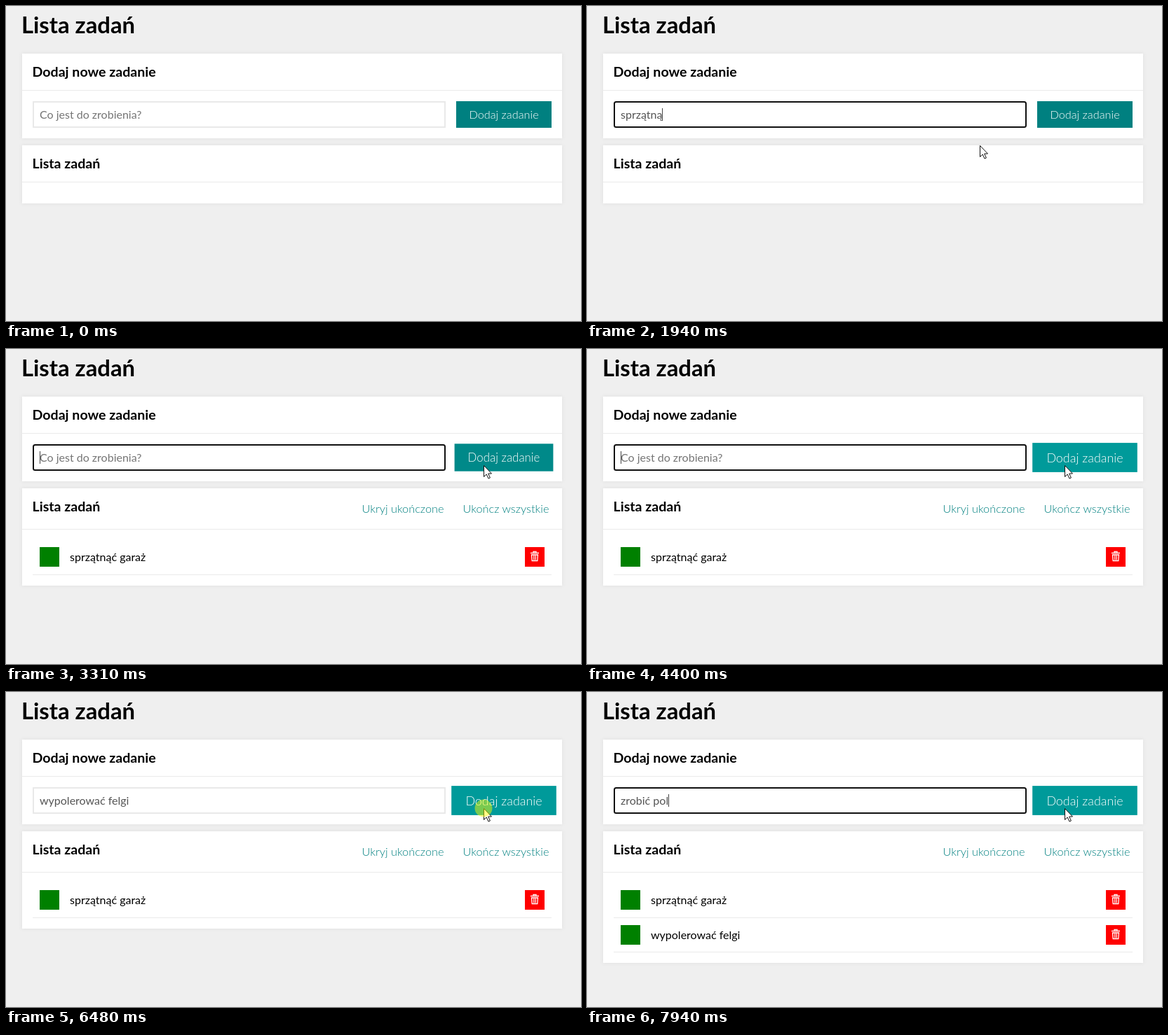
An HTML page that plays this animation: 820 px wide and 450 px high, repeating every 8 s.

```html
<!DOCTYPE html>
<html lang="pl">
<head>
<meta charset="utf-8">
<title>Lista zadań</title>
<style>
  html, body { margin: 0; width: 100%; height: 100%; overflow: hidden; background: #efefef; }
  svg { display: block; width: 820px; height: 450px; font: 16px Lato, sans-serif; }
  .card { fill: #fff; filter: drop-shadow(0 0 2.5px #ddd); }
  .line { fill: #eaeaea; }
  h1, .title { font-weight: 700; font-size: 32.8px; }
  .head { font-weight: 700; font-size: 19.6px; }
  .light { font-weight: 300; font-size: 16.3px; text-anchor: middle; }
  .link { fill: #008080; }
</style>
</head>
<body>
<svg viewBox="0 0 820 450">
  <defs>
    <g id="row">
      <rect x="48" y="283" width="28" height="28" fill="#008000"/>
      <rect x="740" y="283" width="28" height="28" fill="#f00"/>
      <g fill="none" stroke="#fff">
        <path d="M752 290.5v-1h4v1M748 291.5h12" stroke-width="1.4"/>
        <path d="M749.5 294h9l-.7 8.5h-7.6z" stroke-width="1.3"/>
        <path d="M752.3 294.5l.3 7M754 294.5v7M755.7 294.5l-.3 7" stroke-width=".8"/>
      </g>
    </g>
  </defs>
  <rect width="820" height="450" fill="#efefef"/>
  <text class="title" x="22" y="39">Lista zadań</text>

  <rect class="card" x="23" y="68" width="770" height="121"/>
  <rect class="line" x="23" y="120" width="770" height="1"/>
  <text class="head" x="37.5" y="101">Dodaj nowe zadanie</text>
  <rect id="field" fill="#fff" stroke-width="2" x="39" y="137" width="587" height="36"/>
  <text id="value" x="48" y="161"></text>
  <rect id="caret" y="146" width="1" height="18" fill="#444"/>

  <rect id="list" class="card" x="23" y="199" width="770" height="83"/>
  <rect id="listLine" class="line" x="23" width="770" height="1"/>
  <text class="head" x="37.5" y="232">Lista zadań</text>
  <g id="links">
    <text class="light link" x="566" y="234">Ukryj ukończone</text>
    <text class="light link" x="713" y="234">Ukończ wszystkie</text>
  </g>
  <g id="item0">
    <use href="#row"/>
    <text x="91" y="303">sprzątnąć garaż</text>
    <rect class="line" x="38" y="322" width="740" height="1"/>
  </g>
  <g id="item1">
    <use href="#row" y="50"/>
    <text x="91" y="353">wypolerować felgi</text>
    <rect class="line" x="38" y="371" width="740" height="1"/>
  </g>

  <g id="button">
    <rect id="buttonBox" x="-68" y="-19" width="136" height="38"/>
    <text class="light" y="6" fill="#fff">Dodaj zadanie</text>
  </g>
  <g id="pointer">
    <path d="M.5 .5V16.5L4.2 13L7 19L9.4 18L6.7 12H11.5Z" fill="#fff" stroke="#111" stroke-linejoin="round"/>
    <circle id="click" r="12.5" fill="#ff0" fill-opacity=".48"/>
  </g>
</svg>
<script>
const LOOP = 8000, BLINK = 270;
const PLACEHOLDER = 'Co jest do zrobienia?';
const el = id => document.getElementById(id);
const show = (id, on) => el(id).setAttribute('visibility', on ? 'visible' : 'hidden');
const set = (id, attrs) => {
  for (const name in attrs) el(id).setAttribute(name, attrs[name]);
};
const within = (t, [from, to]) => t >= from && t < to;

// Each burst is [first key, last key, number of keys], evenly spaced.
const keyTimes = bursts => bursts.flatMap(([from, to, n]) =>
  Array.from({ length: n }, (_, i) => from + (to - from) * i / (n - 1)));

const entries = [
  { span: [1220, 3310], text: 'sprzątnąć garaż',
    keys: keyTimes([[1430, 1690, 5], [1790, 1940, 3], [2040, 2440, 7]]) },
  { span: [3310, 6540], text: 'wypolerować felgi',
    keys: keyTimes([[4670, 5410, 9], [5480, 6020, 8]]) },
  { span: [6540, LOOP], text: 'zrobić pol',
    keys: keyTimes([[7010, 7740, 8], [7870, 7940, 2]]) }
];
const clicks = [[1220, 1280], [3240, 3310], [6480, 6540]];
const added = [3310, 6540];
const path = [[980, 693, 353], [1160, 562, 158], [1270, 562, 158],
  [1390, 560, 199], [2900, 560, 199], [3170, 681, 166]];

// CSS "ease" timing curve.
function ease(x) {
  if (x <= 0 || x >= 1) return x <= 0 ? 0 : 1;
  const bezier = (s, a, b) => 3 * (1 - s) ** 2 * s * a + 3 * (1 - s) * s * s * b + s ** 3;
  let low = 0, high = 1;
  for (let i = 0; i < 24; i++) {
    const mid = (low + high) / 2;
    if (bezier(mid, 0.25, 0.25) < x) low = mid; else high = mid;
  }
  return bezier(low, 0.1, 1);
}

function tick(t) {
  const [start, step] = t < 2960 ? [980, 60] : [2960, 70];
  return start + Math.floor((t - start) / step) * step;
}

function pointerAt(t) {
  const next = path.findIndex(point => point[0] > t);
  if (next < 1) return path[next < 0 ? path.length - 1 : 0].slice(1);
  const [t0, x0, y0] = path[next - 1], [t1, x1, y1] = path[next];
  const k = (t - t0) / (t1 - t0), s = k * k * (3 - 2 * k);
  return [x0 + (x1 - x0) * s, y0 + (y1 - y0) * s];
}

function drawField(t) {
  const entry = entries.find(e => within(t, e.span));
  const blurred = !entry || clicks.slice(1).some(c => within(t, c));
  const typed = entry ? entry.keys.filter(k => k <= t + 0.01).length : 0;
  const value = el('value');
  value.textContent = typed ? entry.text.slice(0, typed) : PLACEHOLDER;
  value.setAttribute('fill', typed ? '#555' : '#757575');
  set('field', { stroke: blurred ? '#e9e9e9' : '#101010', rx: blurred ? 0 : 2.5 });

  const lastEvent = typed ? entry.keys[typed - 1] : entry ? entry.span[0] : 0;
  show('caret', !blurred && Math.floor((t - lastEvent) / BLINK) % 2 === 0);
  // A trailing space is not rendered, so measure it as a no-break space.
  let width = 0;
  if (typed) {
    value.textContent = value.textContent.replace(/ /g, '\u00a0');
    width = value.getComputedTextLength();
  }
  set('caret', { x: 48 + Math.round(width) });
}

function drawList(t) {
  const count = added.filter(a => t >= a).length;
  set('list', { height: [83, 139, 188][count] });
  set('listLine', { y: count ? 257 : 251 });
  show('links', count > 0);
  show('item0', count > 0);
  show('item1', count > 1);
}

function drawButton(t) {
  const hover = ease((tick(t) - 3130) / 800);
  const shade = Math.round(128 * (1 + 0.2 * hover));
  set('button', { transform: `translate(710 155) scale(${1 + 0.1 * hover})` });
  set('buttonBox', { fill: `rgb(0,${shade},${shade})` });
}

function drawPointer(t) {
  const [x, y] = pointerAt(tick(t)).map(Math.round);
  set('pointer', { transform: `translate(${x} ${y})` });
  show('pointer', t >= 980);
  show('click', clicks.some(c => within(t, c)));
}

function draw(t) {
  drawField(t);
  drawList(t);
  drawButton(t);
  drawPointer(t);
}

let start;
function frame(now) {
  start ??= now;
  draw((now - start) % LOOP);
  requestAnimationFrame(frame);
}
draw(0);
requestAnimationFrame(frame);
</script>
</body>
</html>
```
